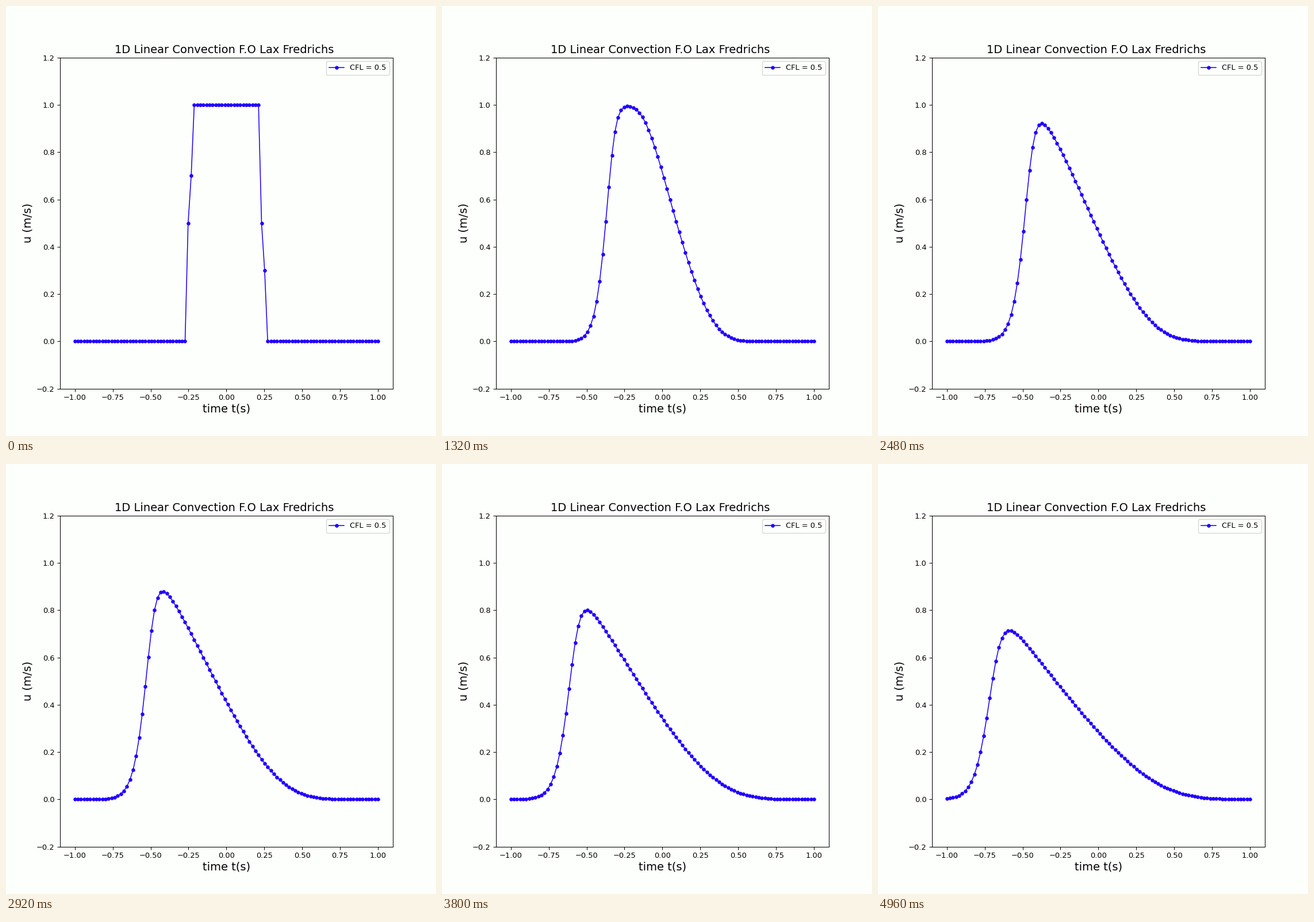
These frames come from a looping animation (748x748 px, 5040 ms). A matplotlib script:

```python
import numpy as np
import matplotlib.pyplot as plt
from matplotlib.animation import FuncAnimation

SIZE, DPI = 748, 93.5
FRAMES, INTERVAL = 126, 40
STEPS = 125
POINTS = 100
COURANT = 0.4      # wave speed per step, in cells, where u = 1
PAPER, BLUE = "#fdfffc", "#2000ff"

plt.rcParams.update({
    "font.family": "DejaVu Sans",
    "figure.facecolor": PAPER,
    "axes.facecolor": PAPER,
})


def advance(u):
    """One step: neighbour average plus a one-sided flux difference."""
    left, right = np.roll(u, 1), np.roll(u, -1)
    return (left + right) / 2 + COURANT * (u**2 - left**2) / 2


def solve(u):
    states = []
    for _ in range(STEPS):
        u = advance(u)
        states.append(u)
    return states


x = np.linspace(-1, 1, POINTS)
states = solve(np.where(np.abs(x) <= 0.25, 1.0, 0.0))

fig, ax = plt.subplots(figsize=(SIZE / DPI, SIZE / DPI), dpi=DPI)
wave, = ax.plot(x, states[0], "-o", color=BLUE, lw=1.2, ms=4, label="CFL = 0.5")
ax.set_xlim(-1.1, 1.1)
ax.set_ylim(-0.2, 1.2)
ax.set_title("1D Linear Convection F.O Lax Fredrichs", fontsize=15, x=0.494)
ax.set_xlabel("time t(s)", fontsize=15, labelpad=3.2)
ax.set_ylabel("u (m/s)", fontsize=15)
ax.legend(loc="upper right")


def draw(frame):
    # The last state is held for one extra tick.
    wave.set_ydata(states[min(frame, STEPS - 1)])
    return wave,


anim = FuncAnimation(fig, draw, frames=FRAMES, interval=INTERVAL,
                     repeat=True, repeat_delay=0)
plt.show()
```
